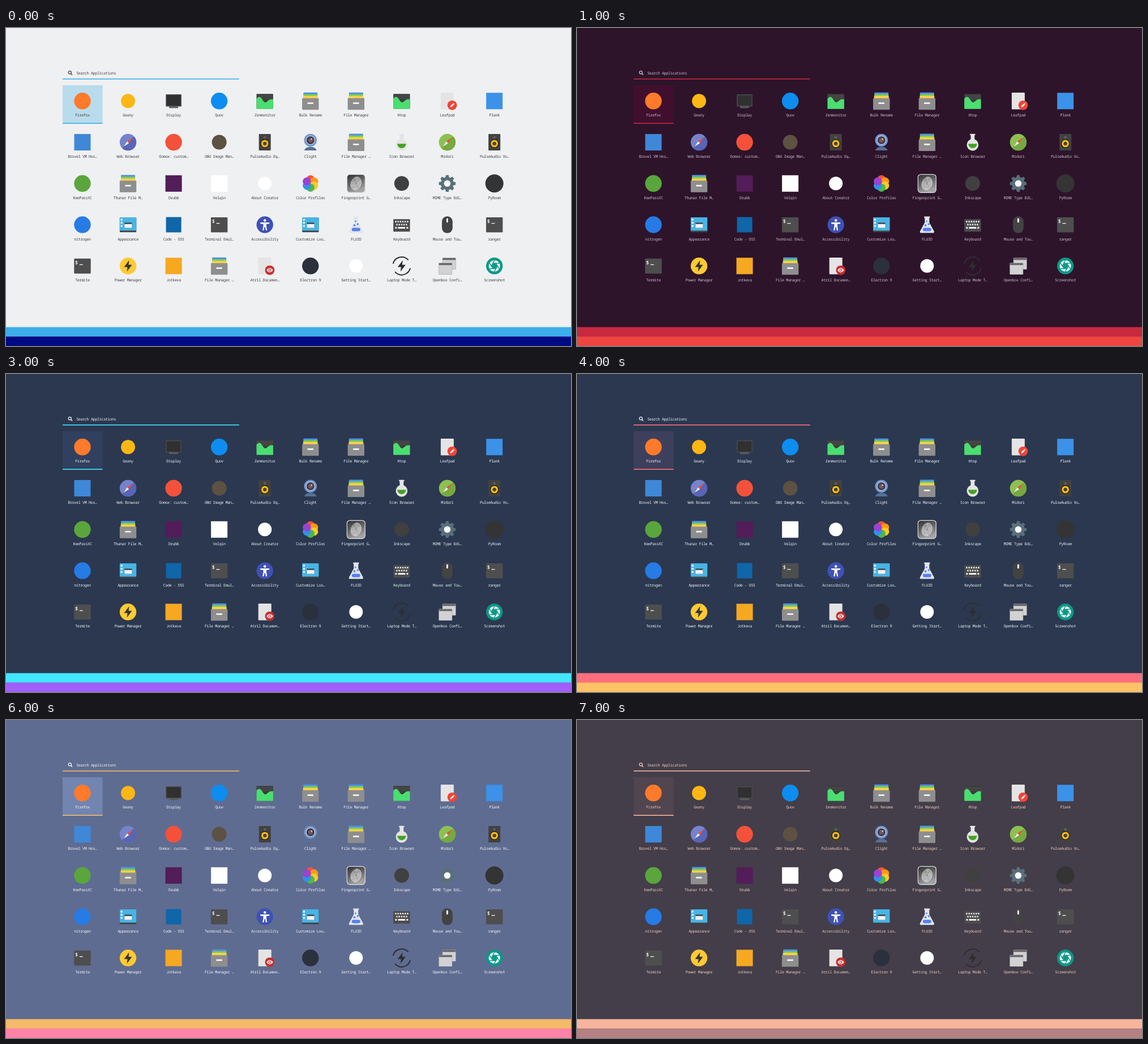
Animation of 998 by 561 pixels, one loop 8000 ms. Source, as an HTML page:

```html
<!DOCTYPE html>
<html lang="en">
<head>
<meta charset="utf-8">
<title>Application menu themes</title>
<style>
html, body { margin: 0; width: 100%; height: 100%; overflow: hidden; }
svg { display: block; width: 100vw; height: 100vh; background: var(--bg); }
text { font-family: "Noto Sans Mono", "DejaVu Sans Mono", monospace; text-rendering: geometricPrecision; }
.label { font-size: 6.8px; letter-spacing: -.4px; fill: var(--text); }
.mid { text-anchor: middle; }
.accent { fill: var(--accent); }
</style>
</head>
<body>
<svg id="stage" viewBox="0 0 998 561" preserveAspectRatio="none"></svg>
<script>
const stage = document.getElementById('stage');
const STEP = 1000;

// background, selected tile, accent, second bar, text
const themes = [
  ['#eff0f2', '#b9dcec', '#3daeeb', '#000a82', '#444444'],
  ['#2d142b', '#400f2e', '#c9293f', '#ef4540', '#c6bcc5'],
  ['#2f3542', '#3b4454', '#57c7a3', '#2f8f83', '#e2e5e8'],
  ['#2b3850', '#31405f', '#43e5ff', '#a15ffa', '#eef1f4'],
  ['#2b3850', '#3d405c', '#ff6f7d', '#ffc266', '#eef1f4'],
  ['#454c6d', '#565a73', '#f2b1b2', '#ca8ca5', '#f0ead8'],
  ['#5f6c91', '#7284b0', '#f5ba69', '#ff82a7', '#f4f4f4'],
  ['#433e4a', '#51454f', '#f6b59c', '#b48082', '#efc9b8']
];
const vars = ['--bg', '--sel', '--accent', '--second', '--text'];

const rect = (x, y, w, h, fill, r = 0) =>
  `<rect x="${x}" y="${y}" width="${w}" height="${h}" rx="${r}" fill="${fill}"/>`;
const circle = (x, y, r, fill) => `<circle cx="${x}" cy="${y}" r="${r}" fill="${fill}"/>`;
const path = (d, fill) => `<path d="${d}" fill="${fill}"/>`;
const line = (d, stroke, w = 1) =>
  `<path d="${d}" fill="none" stroke="${stroke}" stroke-width="${w}"/>`;
const turn = (a, body) => `<g transform="rotate(${a})">${body}</g>`;
const ring = (n, draw) => Array.from({ length: n }, (_, i) => turn(i * 360 / n, draw(i))).join('');

const disc = (fill, r = 14.7) => circle(0, 0, r, fill);
const square = (fill, r = 14.5) => rect(-r, -r, 2 * r, 2 * r, fill);
const bolt = fill => path('M2-10-7 2H-1L-2 10 7-2H1Z', fill);
const sheet = badge => rect(-11.5, -14.7, 23, 29.5, '#e4e4e4', 1) + circle(8.7, 7.5, 8.4, badge);
const needle = path('M8.5-8.5 1.6 1.6-1.6-1.6Z', '#f04c3e') + path('M-7.5 7.5 1.6 1.6-1.6-1.6Z', '#eeeeee');
const compass = (fill, shade) => disc(fill) + path('M10.4-10.4A14.7 14.7 0 0 1-10.4 10.4Z', shade) + needle;

function files() {
  return rect(-12.5, -15, 25, 5, '#5294e2', 1) + rect(-12.5, -11.8, 25, 4, '#83d14b', .6) +
    rect(-13, -8.8, 26, 5, '#ffd248', .6) + rect(-14.7, -5, 29.4, 20.4, '#8e8e8e', 1) +
    rect(-5.3, 2.4, 10.6, 2.9, '#f5f5f5', .8);
}

function chart() {
  const rows = [-10, -7.4, -4.8].map(y => rect(-14.7, y, 29.4, .7, '#595959')).join('');
  return rect(-14.7, -12.6, 29.4, 26.4, '#3d3d3d', 1) + rows +
    path('M-14.7-4C-10-10-7-7-4-2S1 4 5 0 11-3 14.7-3V13Q14.7 14 13.7 14H-13.7Q-14.7 14-14.7 13Z', '#4ade70');
}

function display() {
  return rect(-13.8, -11.8, 27.6, 21.5, '#4a4a4a', 1) + rect(-12.3, -10.2, 24.6, 18.2, '#303030') +
    rect(-8, 9.4, 16, 3, '#5c5c5c', .6);
}

function edit() {
  return sheet('#f44336') + `<g transform="translate(8.7 7.5) rotate(45)">` +
    rect(-1.4, -4.8, 2.8, 1.6, '#fff') + path('M-1.4-2.6H1.4V2.6L0 5-1.4 2.6Z', '#fff') + '</g>';
}

function speaker() {
  return rect(-10.5, -14.5, 21, 29, '#424242', 1) + circle(0, -8.5, 2.3, '#606060') +
    circle(0, 2.3, 8, '#292929') + circle(0, 2.3, 6.4, '#fdbc14') + circle(0, 2.3, 3.2, '#4a4136');
}

function camera() {
  return path('M-11 14.5Q-9 8 0 8T11 14.5Z', '#596f96') + circle(0, -3.5, 11.3, '#6f98d3') +
    circle(0, -3.5, 8.2, '#c5d0df') + circle(0, -3.5, 7, '#443944') +
    circle(0, -3.5, 4, '#755767') + circle(2, -5.5, 1.3, '#ddd4dd');
}

function roundFlask() {
  return rect(-4.7, -14.7, 9.4, 2.4, '#e4e4e4', 1) + rect(-3.4, -13, 6.8, 12, '#e4e4e4') +
    circle(0, 4.6, 10.3, '#e4e4e4') + path('M-7.7 2.7H7.7A7.7 7.7 0 0 1-7.7 2.7Z', '#43a321');
}

function petals() {
  const hues = ['#ff5338', '#ff9818', '#ffca28', '#4bb84b', '#2f92ed', '#9b42d3'];
  return ring(6, i => circle(0, -7.4, 7.2, hues[i]));
}

function print() {
  let ridges = '';
  for (let r = 1.4; r < 9; r += 1.8)
    ridges += `<ellipse rx="${r}" ry="${r + 3}" fill="none" stroke="#efefef" stroke-width=".9"/>`;
  return `<rect x="-16" y="-16" width="32" height="32" rx="5" fill="url(#steel)" stroke="#dedede" stroke-width="1.2"/>` +
    turn(20, ridges);
}

function gear() {
  return ring(8, () => path('M-3.6-9-2.4-14.7H2.4L3.6-9Z', '#596f7b')) +
    disc('#596f7b', 11.3) + circle(0, 0, 5.8, '#f8f8f8');
}

function panel() {
  return rect(-14.7, -13, 29.4, 26.2, '#414141', 1) + rect(-14.7, -13, 29.4, 23.4, '#47b4e5', 1) +
    [-10.6, -5, .6].map(y => rect(-13, y, 3.2, 3.2, '#f3f3f3', .4)).join('') +
    rect(-6.2, -3.8, 13, 9.4, '#3c4a52', .5) + rect(-6.2, -1.2, 13, 6.8, '#f3f3f3');
}

function terminal() {
  return rect(-14.7, -13, 29.4, 26.4, '#4e4e4e', 1) +
    '<text x="-13" y="-2.7" font-size="8.7" font-weight="700" fill="#f5f5f5">$</text>' +
    rect(-5.2, -3, 6, 1.3, '#f5f5f5');
}

function person() {
  return disc('#3f51b5') + circle(0, -7.6, 2.3, '#fff') +
    path('M-8-4H8V-1.7L2.7-1V2.4L4 10H1.8L.6 4H-.6L-1.8 10H-4L-2.7 2.4V-1L-8-1.7Z', '#fff');
}

function coneFlask() {
  return path('M-5-14.5H5V-12H4V-4L12.6 12Q13 14.5 11 14.5H-11Q-13 14.5-12.6 12L-4-4V-12H-5Z', '#e2e5eb') +
    rect(-7.5, 5.5, 15, 6, '#5481f2', 3) +
    circle(-2.8, 1, 1.9, '#5481f2') + circle(3, -1, 1.7, '#5481f2') + circle(-.8, -6, 1.4, '#5481f2');
}

function keyboard() {
  let keys = '';
  for (let i = 0; i < 6; i++) {
    keys += rect(-11.6 + i * 4.2, -6.8, 2.4, 2.8, '#eee', .3);
    if (i < 5) keys += rect(-9.5 + i * 4.2, -1.6, 2.4, 2.8, '#eee', .3);
  }
  return rect(-14.7, -9.8, 29.4, 22, '#4c4c4c', 1) + keys + rect(-11.5, 4, 3, 3, '#eee', .3) +
    rect(-6.5, 4, 13, 3, '#eee', .3) + rect(8.5, 4, 3, 3, '#eee', .3);
}

const mouse = () => rect(-9.4, -14.8, 18.8, 29.6, '#434343', 9) + rect(-1.5, -11.5, 3, 7.6, '#f2f2f2', 1.5);

function view() {
  return sheet('#c62f30') + path('M3 7.5Q8.7 0 14.4 7.5 8.7 15 3 7.5Z', '#fff') +
    circle(8.7, 7.5, 2.5, '#c62f30') + circle(8.7, 7.5, 1.2, '#fff');
}

function laptop() {
  return line('M-15.2-4A15.7 15.7 0 0 1 11.8-10.4M15.2 4A15.7 15.7 0 0 1-11.8 10.4', '#2e2e31', 2) +
    bolt('#2e2e31');
}

function windows() {
  const win = (x, y) => rect(x - .4, y - .4, 23.8, 20.6, '#98989b', 1) +
    rect(x, y, 23, 19.8, '#d2d2d4', .6) + rect(x, y, 23, 3.4, '#68686b', .6);
  return win(-8.2, -14) + win(-14.6, -5);
}

function aperture() {
  return disc('#0c9888') + disc('#fff', 10) +
    ring(6, () => line('M-3-4.8H9', '#0c9888', 1.5)) +
    path('M-2.4-4.2H2.4L4.8 0 2.4 4.2H-2.4L-4.8 0Z', '#0c9888');
}

const apps = [
  ['Firefox', disc('#ff7a2b')],
  ['Geany', disc('#fdb714', 12.5)],
  ['Display', display()],
  ['Quov', disc('#0d8df0')],
  ['Zenmonitor', chart()],
  ['Bulk Rename', files()],
  ['File Manager', files()],
  ['Htop', chart()],
  ['Leafpad', edit()],
  ['Plank', square('#3b92e8')],
  ['Brovel VM Hos…', square('#3f88d8')],
  ['Web Browser', compass('#7583cc', '#5965b5')],
  ['Oomox: custom…', disc('#f4513b')],
  ['GNU Image Man…', disc('#5c5142', 13)],
  ['PulseAudio Eq…', speaker()],
  ['Clight', camera()],
  ['File Manager …', files()],
  ['Icon Browser', roundFlask()],
  ['Midori', compass('#8cc152', '#76a940')],
  ['PulseAudio Vo…', speaker()],
  ['KeePassXC', disc('#5aa63c')],
  ['Thunar File M…', files()],
  ['Drubb', square('#521d58')],
  ['Velqin', square('#ffffff')],
  ['About Creator', disc('#ffffff', 12)],
  ['Color Profiles', petals()],
  ['Fingerprint G…', print()],
  ['Inkscape', disc('#404040', 13)],
  ['MIME Type Edi…', gear()],
  ['PyRoom', disc('#343434', 16)],
  ['nitrogen', disc('#267be5')],
  ['Appearance', panel()],
  ['Code - OSS', square('#0f66a9', 13.5)],
  ['Terminal Emul…', terminal()],
  ['Accessibility', person()],
  ['Customize Loo…', panel()],
  ['FLUID', coneFlask()],
  ['Keyboard', keyboard()],
  ['Mouse and Tou…', mouse()],
  ['ranger', terminal()],
  ['Termite', terminal()],
  ['Power Manager', disc('#ffca32') + bolt('#343434')],
  ['Jotkeva', square('#f6a821')],
  ['File Manager …', files()],
  ['Atril Documen…', view()],
  ['Electron 9', disc('#2b303d')],
  ['Getting Start…', disc('#ffffff', 12)],
  ['Laptop Mode T…', laptop()],
  ['Openbox Confi…', windows()],
  ['Screenshot', aperture()]
];

function cell([name, icon], i) {
  const col = i % 10;
  const x = col === 9 ? 862.7 : 135 + col * 80.55;
  const y = 128.8 + Math.floor(i / 10) * 72.75;
  return `<g transform="translate(${x} ${y})">${icon}<text class="label mid" y="27.6">${name}</text></g>`;
}

stage.innerHTML = `
  <defs><linearGradient id="steel" x2=".4" y2="1">
    <stop stop-color="#303030"/><stop offset=".55" stop-color="#686868"/><stop offset="1" stop-color="#a4a4a4"/>
  </linearGradient></defs>
  ${rect(100, 101, 70.6, 67.8, 'var(--sel)')}
  <rect class="accent" x="100" y="167.4" width="70.6" height="1.6"/>
  <rect class="accent" x="100" y="89.1" width="311.8" height="1.6"/>
  <rect class="accent" y="527.7" width="998" height="17"/>
  ${rect(0, 544.3, 998, 16.7, 'var(--second)')}
  <circle cx="112.8" cy="78.4" r="2.5" fill="none" stroke="var(--text)" stroke-width="1.3"/>
  ${line('M114.6 80.2 117 82.6', 'var(--text)', 1.5)}
  <text class="label" x="124.2" y="81.5">Search Applications</text>
  ${apps.map(cell).join('')}`;

let shown = -1;
const start = performance.now();

function render(time) {
  const index = Math.floor(time / STEP) % themes.length;
  if (index === shown) return;
  shown = index;
  vars.forEach((name, i) => stage.style.setProperty(name, themes[index][i]));
}

function tick() {
  render(performance.now() - start);
  requestAnimationFrame(tick);
}
tick();
</script>
</body>
</html>
```
